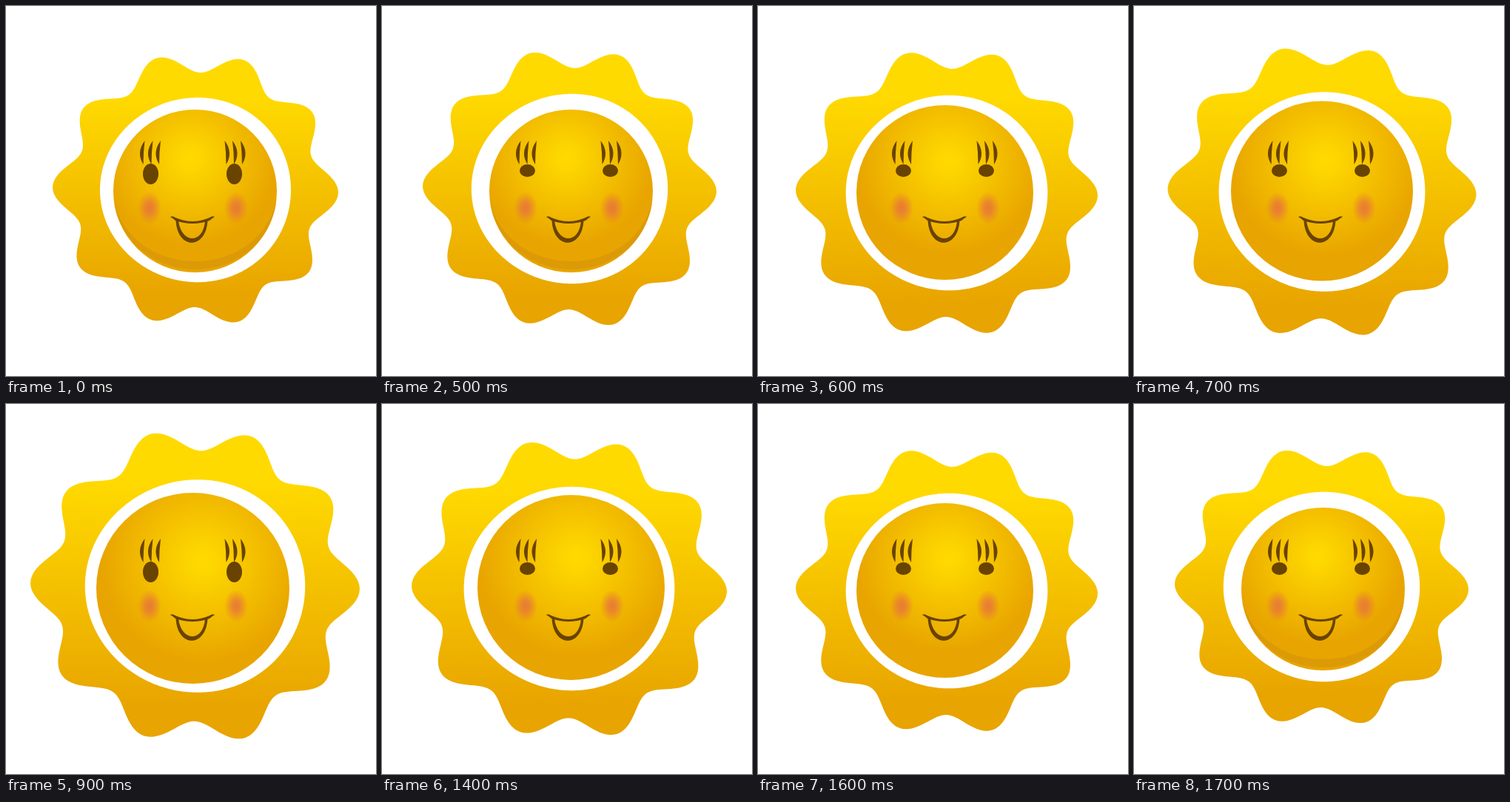
An HTML page that plays this animation: 500 px wide and 500 px high, repeating every 1.8 s.

```html
<!DOCTYPE html>
<html lang="en">
<head>
<meta charset="utf-8">
<title>Smiling sun</title>
<style>
  html, body { margin: 0; width: 100%; height: 100%; overflow: hidden; background: #fff; }
  svg { display: block; width: 100%; height: 100%; }
</style>
</head>
<body>
<svg viewBox="0 0 500 500">
  <defs>
    <linearGradient id="rayFill" x2="0" y2="1">
      <stop offset=".15" stop-color="#ffda00"/>
      <stop offset=".9" stop-color="#e8a400"/>
    </linearGradient>
    <radialGradient id="faceFill">
      <stop offset="0" stop-color="#ffda00"/>
      <stop offset=".12" stop-color="#fdd600"/>
      <stop offset="1" stop-color="#e8a400"/>
    </radialGradient>
    <radialGradient id="blush">
      <stop offset="0" stop-color="#e87b35"/>
      <stop offset=".35" stop-color="#e87b35" stop-opacity=".8"/>
      <stop offset="1" stop-color="#e87b35" stop-opacity="0"/>
    </radialGradient>
    <path id="lash" d="M187.500 182Q175.500 198 185.500 214Q185.500 198 187.500 182"/>
    <g id="lashes">
      <use href="#lash"/><use href="#lash" x="11"/><use href="#lash" x="21.500"/>
    </g>
  </defs>

  <path id="rays" fill="url(#rayFill)" fill-rule="evenodd"/>
  <ellipse id="face" fill="url(#faceFill)"/>
  <path id="shade" fill="#dc9a06" d="M146 265C159 317 206 345 256 345C308 345 354 314 365.500 263C358 320 312 356 256 356C200 356 154 318 146 265"/>

  <g fill="url(#blush)">
    <ellipse cx="194" cy="273" rx="16" ry="22"/>
    <ellipse cx="311" cy="273" rx="16" ry="22"/>
  </g>
  <g fill="#694300">
    <use href="#lashes"/>
    <use href="#lashes" transform="matrix(-1 0 0 1 504.500 0)"/>
    <ellipse class="eye" rx="10.500"/>
    <ellipse class="eye" rx="10.500"/>
    <path d="M222 285Q225 283 229 286Q252 296 275 286Q279 283 282 285Q278 287 275 290Q252 298 229 290Q226 287 222 285"/>
    <path d="M229.500 289C231 330 271 330 272.500 289L269 290C267 322 237 322 233 290Z"/>
  </g>
</svg>
<script>
  const $ = id => document.getElementById(id);
  const setAttrs = (el, attrs) => {
    for (const name in attrs) el.setAttribute(name, attrs[name]);
  };

  // sun: centre x, centre y, width; face: cx, cy, rx, ry; glow: cx, cy, r
  const smallFace = [255.5, 250, 110.5, 110], smallGlow = [.47, .3, .54];
  const poses = [
    { sun: [256, 248.5, 386], face: smallFace, glow: smallGlow },
    { sun: [253.5, 247, 397], face: smallFace, glow: smallGlow },
    { sun: [255, 252.5, 408], face: [252.5, 252, 119.5, 118], glow: [.52, .32, .53] },
    { sun: [254, 251, 417], face: [254, 250, 123, 121.5], glow: [.52, .33, .53] },
    { sun: [253, 249.5, 426], face: [255.5, 248, 126.5, 125], glow: [.53, .34, .53] },
    { sun: [255.5, 246, 445], face: [252.5, 249, 130.5, 129], glow: [.55, .36, .53] }
  ];
  const lastPose = poses.length - 1;

  // Closed, slightly flattened curve whose top and bottom sit a little to the right
  function ring(radiusAt) {
    const points = [];
    for (let deg = 0; deg < 360; deg++) {
      const angle = deg * Math.PI / 180, radius = radiusAt(angle);
      const x = radius * Math.cos(angle) + 3 * Math.sin(angle) ** 2;
      const y = .967 * radius * Math.sin(angle);
      points.push(x.toFixed(2) + " " + y.toFixed(2));
    }
    return "M" + points.join("L") + "Z";
  }

  // Ten soft rays, shorter on the diagonals
  const rayRadius = angle =>
    177.2 + 14.5 * Math.cos(10 * (angle - .021)) + 1.3 * Math.cos(4 * angle);

  function poseAt(ms) {
    if (ms < 500) return 0;
    if (ms < 900) return Math.floor(ms / 100) - 4;
    if (ms < 1400) return lastPose;
    return 18 - Math.floor(ms / 100);
  }

  function show(index) {
    const { sun, face, glow } = poses[index];
    const [x, y, width] = sun;
    setAttrs($("rays"), { transform: `translate(${x} ${y}) scale(${width / 386})` });
    setAttrs($("face"), { cx: face[0], cy: face[1], rx: face[2], ry: face[3] });
    setAttrs($("faceFill"), { cx: glow[0], cy: glow[1], r: glow[2] });
    setAttrs($("shade"), { opacity: index < 2 ? 1 : 0 });

    const open = index === 0 || index === lastPose;
    document.querySelectorAll(".eye").forEach((eye, i) => setAttrs(eye, {
      cx: i ? 308.5 : open ? 195.5 : 196.5,
      cy: open ? 227 : 222.5,
      ry: open ? 14 : 8.5
    }));
  }

  function draw() {
    show(poseAt(performance.now() % 1800));
    requestAnimationFrame(draw);
  }

  setAttrs($("rays"), { d: ring(rayRadius) + ring(() => 129) });
  draw();
</script>
</body>
</html>
```
